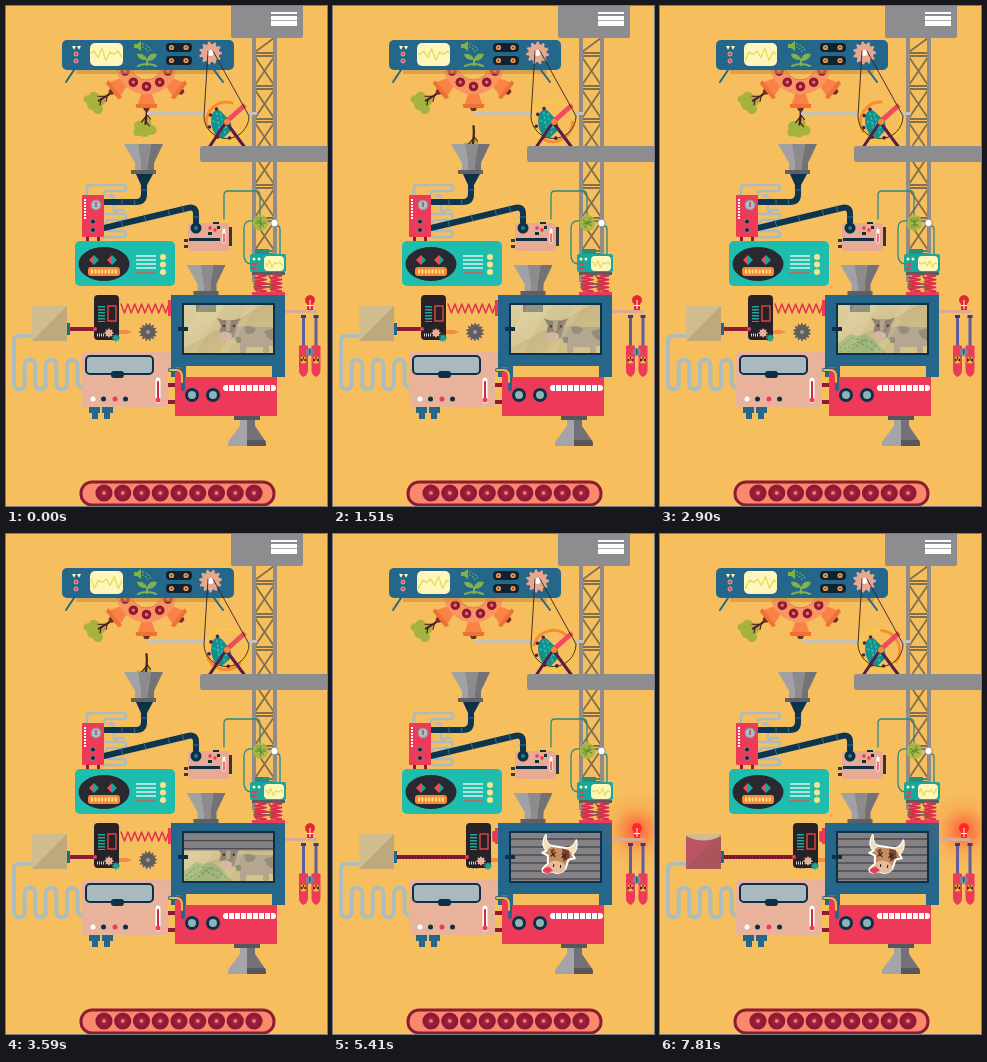
Recreate the animation shown at these times as an HTML page. Size 321 by 500 pixels, loop 8 s.

```html
<!DOCTYPE html>
<html lang="en">
<head>
<meta charset="utf-8">
<title>Machine</title>
<style>
html, body { margin: 0; width: 100%; height: 100%; overflow: hidden; background: #f6be5d; }
svg { display: block; width: 100vw; height: 100vh; }
.l { fill: none; stroke-linecap: round; stroke-linejoin: round; }
.blue { fill: #25678b; } .navy { fill: #0d3048; } .red { fill: #ee3a59; }
.peach { fill: #e9b29b; } .teal { fill: #1fbdae; } .gray { fill: #8d8c8f; }
.cream { fill: #fdf6bd; } .wine { fill: #8d1b35; } .orange { fill: #fb8f4d; }
</style>
</head>
<body>
<svg viewBox="0 0 321 500">
<defs>
  <clipPath id="drop"><path d="M70 0H200V140H70z"/></clipPath>
  <clipPath id="below"><path d="M60 40H220V140H60z"/></clipPath>
  <clipPath id="pane"><path d="M178 299H267V347H178z"/></clipPath>
  <clipPath id="scrA"><rect x="85" y="38" width="31" height="21" rx="4"/></clipPath>
  <clipPath id="scrB"><rect x="259" y="251" width="18" height="13" rx="3"/></clipPath>
  <linearGradient id="glass" x2="1" y2="1">
    <stop offset="0" stop-color="#ddd0a0"/><stop offset=".45" stop-color="#d2c290"/>
    <stop offset=".45" stop-color="#c7b583"/><stop offset="1" stop-color="#d9c78f"/>
  </linearGradient>
  <radialGradient id="glow">
    <stop offset="0" stop-color="#ff3b30" stop-opacity=".8"/><stop offset=".3" stop-color="#ff4a30" stop-opacity=".45"/>
    <stop offset=".6" stop-color="#ff5a30" stop-opacity=".13"/><stop offset="1" stop-color="#ff5a30" stop-opacity="0"/>
  </radialGradient>
  <g id="tree">
    <g fill="#a6b23f"><circle cx="-7" cy="62" r="5.500"/><circle cx="0" cy="59" r="5"/><circle cx="-2" cy="67" r="6"/><circle cx="5" cy="66" r="5"/><circle cx="-9" cy="68" r="4"/></g>
    <path class="l" stroke="#4a1f23" stroke-width="2.2" d="M0 40Q1 50-1 60"/>
    <path class="l" stroke="#4a1f23" stroke-width="1.2" d="M0 50L4 55M0 52L-5 58M-1 57L3 62"/>
  </g>
  <g id="pot">
    <path fill="#6d2f25" d="M-4 43H4L2 47H-2z"/>
    <path fill="#f98246" d="M-5 29H5L9 41H-9z"/>
    <path fill="#ef7136" d="M-11 40H11L10 44H-10z"/>
  </g>
  <g id="funnel">
    <path fill="#a1a2a5" d="M0 0H14L17 19V27H11V19z"/><path fill="#8c8c90" d="M14 0H27L24 19V27H17V19z"/>
    <path fill="#737277" d="M27 0H39L30 19V27H24V19z"/><path fill="#5f5f64" d="M7 26H32V30H7z"/>
  </g>
  <g id="can">
    <rect x="-1.5" y="-31" width="3" height="33" fill="#625c9d"/><path fill="#3f3c78" d="M-2.500-31H2.500V-28H-2.500z"/>
    <path class="red" d="M-4.500 0Q0-2 4.500 0V24Q4.500 29 0 31Q-4.500 29-4.500 24z"/>
    <circle cy="14" r="3.5" fill="#f8b93c"/><path fill="#50202b" d="M0 14L-3 12V16zM0 14L3 12V16zM0 14L-1 11H1z"/>
  </g>
</defs>

<path fill="#f6be5d" d="M0 0H321V500H0z"/>

<!-- crane -->
<g id="truss" class="l" stroke="#81704f" stroke-width="1.8"></g>
<path fill="#918c89" d="M246 32H250V276H246zM267 32H271V276H267z"/>
<rect class="gray" x="225" y="-4" width="72" height="36" rx="2"/>
<path fill="#fff" d="M265 6H291V8H265zM265 10H291V14H265zM265 14.800H291V20H265z"/>

<!-- tree wheel -->
<g id="falling" clip-path="url(#drop)"><use id="fallTree" href="#tree"/></g>
<g clip-path="url(#below)"><g transform="translate(140.500 58)">
  <g id="pots"></g>
  <circle r="23" fill="none" stroke="#fa9562" stroke-width="15"/><circle r="16" fill="none" stroke="#e27a50" stroke-width="1"/>
  <g id="disk"></g>
</g></g>
<path fill="#c98f3f" opacity=".6" d="M70 64H214V68H70z"/>

<!-- top console -->
<path class="l" stroke="#25678b" stroke-width="2" d="M68 64L60 76M208 64L217 76"/>
<rect class="blue" x="56" y="34" width="172" height="30" rx="5"/>
<path class="cream" d="M66 40H70L68 44zM71 40H75L73 44z"/>
<g fill="#ee3a59" stroke="#e7a8a0" stroke-width="1"><circle cx="70" cy="48" r="2"/><circle cx="70" cy="55" r="2"/></g>
<rect class="cream" x="84" y="37" width="33" height="23" rx="5"/>
<g clip-path="url(#scrA)"><path id="waveA" class="l" stroke="#ecd955" stroke-width="1.3"/></g>
<g fill="#7fb24b"><path d="M128 38H131L135 35V45L131 42H128z"/><path d="M140 60V54Q132 54 131 48Q138 47 141 53Q144 46 151 48Q149 55 142 55V60z"/></g>
<path class="l" stroke="#7fb24b" stroke-width="2" d="M132 60Q141 56 150 60"/>
<path class="l" stroke="#7fb24b" stroke-width="1.5" stroke-dasharray=".1 3" d="M137 38Q145 41 145 46M137 41Q141 43 142 46"/>
<g id="pills"></g>

<!-- runner wheel -->
<path fill="#c9c2b3" d="M141 106H200V109H141zM240 106H251V109H240z"/>
<g id="gear" fill="#e7a88f"></g><circle cx="204.500" cy="47" r="3" fill="#fff"/>
<g id="spin">
  <circle r="21" fill="none" stroke="#f7cf35" stroke-width="1.6"/>
  <path class="l" stroke="#f98c35" stroke-width="3" d="M-19 5A20 20 0 0 1 6-19"/>
</g>
<g id="runner">
  <path fill="#138f8d" d="M-13-8Q-8-14-4-9L1-4Q8 1 5 10L-2 17L-10 14Q-17 3-13-8z"/>
  <path class="l" stroke="#2ac4b5" stroke-width="1.5" stroke-dasharray="1.500 3" d="M-9-8L-5 13M-5-7L0 13M-12 0L3 7"/>
  <g fill="#522047"><circle cx="-15" cy="-6" r="1.8"/><circle cx="-16" cy="6" r="1.8"/><circle cx="-9" cy="-12" r="1.8"/><circle cx="-8" cy="16" r="1.8"/><circle cx="4" cy="17" r="1.8"/></g>
</g>
<path stroke="#ef4b61" stroke-width="5" d="M220 116L239 99"/>
<path class="l" stroke="#302328" stroke-width=".9" d="M202 45L198 110A22.500 22.500 0 1 0 243 110L207 45"/>
<path class="l" stroke="#5a1b46" stroke-width="3" d="M202 143L220 116L240 143"/>
<circle cx="221" cy="116" r="3" fill="#f58a35"/>
<path class="gray" d="M197 140H321V156H197Q194 156 194 153V143Q194 140 197 140z"/>

<!-- coils, pipes, red controller -->
<path class="l" stroke="#a9bcc1" stroke-width="2.600" d="M81 190V182Q81 179 84 179H117Q120 179 120 182T117 185H101Q98 185 98 188M98 208H117Q120 208 120 211T117 214H103Q100 214 100 217M98 231H117Q120 231 120 228T117 225H102M103 190Q106 188 108 192V204Q109 207 113 204H118"/>
<path fill="#0d3048" d="M130 168H147L141 179H135z"/>
<g class="l" stroke="#0d3550" stroke-width="6"><path d="M138 174V188Q138 196 130 196H99"/><path d="M98 222L182 202Q190 200 190 208V219"/></g>
<path class="l" stroke="#31738d" stroke-width="1" d="M135 184H141M116 193V199M128 193L129 199M115 215L117 221M138 209L140 215M162 204L164 210M176 200L178 206M187 211H193"/>
<use href="#funnel" x="118" y="138"/>
<path fill="#8d1b35" d="M80 231H83V236H80zM91 231H94V236H91z"/>
<rect class="red" x="76" y="189" width="22" height="42" rx="1"/>
<circle cx="90" cy="199" r="5" fill="#aebfc2" stroke="#8d8c8f"/><path stroke="#8d1b35" d="M90 196V201"/>
<path stroke="#fff" stroke-width="2" stroke-dasharray="2 1" d="M79 193V214"/>
<g class="navy" stroke="#b8828f" stroke-width=".8"><circle cx="87" cy="215.500" r="2.500"/><circle cx="87" cy="224" r="2.500"/></g>

<!-- mixer -->
<path fill="#3a3539" d="M178 233H184V236H178zM178 239H184V242H178zM222 221H226V240H222z"/>
<rect x="182" y="217" width="41" height="28" rx="2" fill="#e8aa93"/>
<circle cx="190" cy="222" r="5.500" class="navy"/><circle cx="190" cy="222" r="2" fill="#31738d"/>
<path class="navy" d="M183 232H214V235H183z"/>
<g class="red"><circle cx="204" cy="222" r="1.8"/><circle cx="209" cy="224" r="1.8"/></g><path class="navy" d="M202 226H206V229H202zM211 220H214V223H211zM207 216H213V218H207z"/>
<path class="l" stroke="#fff" stroke-width="3" d="M218 224V236"/><path class="l" stroke="#ee3a59" stroke-width="1.5" d="M218 228V236"/>

<!-- radio -->
<rect class="teal" x="69" y="235" width="100" height="45" rx="5"/>
<ellipse cx="98" cy="258" rx="25.500" ry="17" fill="#29292f"/>
<path fill="#ee4b55" d="M83 254L88 249V259zM101 254L106 249V259z"/><path fill="#19a39a" d="M88 249L93 254L88 259zM106 249L111 254L106 259z"/>
<rect x="82" y="261" width="32" height="9" rx="3" fill="#f58a35"/><path stroke="#fde08c" stroke-width="4" stroke-dasharray="2 1.4" d="M85 265.500H112"/>
<path stroke="#d8f3ea" stroke-width="1.3" d="M130 250H150M130 254H150M130 258H150M130 262H150"/><path stroke="#ee4b55" stroke-width="1.3" d="M130 267H150"/>
<g fill="#f8e38b"><circle cx="157" cy="251" r="3"/><circle cx="157" cy="258.500" r="3"/><circle cx="157" cy="266" r="3"/></g>

<!-- bulb unit -->
<path class="l" stroke="#278b87" stroke-width="1.300" d="M218 213V189Q218 185 222 185H250Q254 185 254 190V209M247 215Q238 214 238 222V249Q238 257 245 258M268 220H272Q274 220 274 224V248"/>
<circle cx="254.500" cy="217" r="8" fill="#a8b83d" opacity=".85"/><g id="bulb" class="l" stroke="#5f8f3a" stroke-width="1.2"><path d="M-5 0H5M0-5V5M-3-3L3 3"/></g>
<path fill="#278b87" d="M249 243H263V248H249z"/><circle cx="268.500" cy="217" r="3.800" fill="#fff" stroke="#8d8c8f"/>
<rect x="244" y="248" width="36" height="18" rx="2" fill="#19a79c"/>
<rect class="cream" x="258" y="250" width="20" height="15" rx="4"/>
<g clip-path="url(#scrB)"><path id="waveB" class="l" stroke="#ecd955" stroke-width="1.2"/></g>
<g class="cream"><circle cx="248" cy="253" r="1.500"/><circle cx="253" cy="253" r="1.500"/></g><path class="red" d="M246 257H251V259H246zM246 261H251V263H246z"/>
<path fill="#4c655c" d="M246 266H279V269H246z"/>
<g id="coils" class="l" stroke="#d52f4c" stroke-width="1.8"></g>
<path class="red" d="M246 286H279V290H246z"/>

<!-- puller -->
<path class="l" stroke="#a9bdc2" stroke-width="4" d="M28 330H13Q8 330 8 335V378A5.300 5.300 0 0 0 18.600 378V359A5.300 5.300 0 0 1 29.200 359V378A5.300 5.300 0 0 0 39.800 378V359A5.300 5.300 0 0 1 50.400 359V378A5.300 5.300 0 0 0 61 378V359A5.300 5.300 0 0 1 71.600 359V376Q72 382 77 381"/>
<path class="blue" d="M60 317H64V329H60z"/>
<path fill="#cfbc8f" d="M26 300H61V335H26z"/>
<path id="liquid" fill="#b85463"/>
<path fill="#7e5a30" opacity=".2" d="M61 300V335H26z"/>
<path id="rope" stroke="#8d1b35" stroke-width="4"/><path id="twist" stroke="#5c1428" stroke-width="4" stroke-dasharray="1 2"/>
<g id="saw" fill="#615e60"></g><circle cx="142" cy="326" r="2" fill="#a09b94"/>
<path id="spring" class="l" stroke="#df3952" stroke-width="1.6"/><path class="red" d="M162 294H166V310H162z"/>
<g id="phone">
  <path fill="#f58a45" d="M113 324H121L126 326L121 328H113z"/>
  <rect x="88" y="289" width="25" height="45" rx="4" fill="#272228"/>
  <rect x="102" y="300" width="8" height="15" fill="none" stroke="#ee4b45" stroke-width="1.300"/>
  <path stroke="#23a69d" stroke-width="7" stroke-dasharray="1.500 1.500" d="M95.500 300V316"/>
  <circle cx="89" cy="323" r="2" class="red"/><path stroke="#d4d4ca" stroke-width="3" stroke-dasharray="1 1" d="M91 329H98"/>
  <g id="cogA" fill="#e7b195"></g><g id="cogB" fill="#20a195"></g>
</g>

<!-- chamber -->
<g id="cubes"></g>
<use href="#funnel" x="180.500" y="259"/>
<path class="blue" d="M165 289H279V371H266V360H180V371H165z"/>
<path class="navy" d="M176 297H269V349H176z"/>
<g clip-path="url(#pane)">
  <path fill="url(#glass)" d="M178 299H267V347H178z"/>
  <path fill="#6f7470" opacity=".8" d="M190 299H210V306H190z"/>
  <g id="cow">
    <path fill="#b3a78f" d="M225 323Q235 318 250 321H272V340H263V350H257V341H240V350H234V337Q226 335 225 323z"/>
    <path fill="#958c7b" d="M238 321Q246 319 250 323Q247 330 240 327zM258 325L272 321V335Q262 336 258 325zM229 331H235V337H231z"/>
    <g id="cowHead"><path fill="#8d8273" d="M211 312L217 314H229L235 312L231 320L228 331Q220 337 213 330L215 319z"/><path fill="#b3a58c" d="M220 314H225L224 325H220z"/><ellipse cx="219" cy="330" rx="7" ry="4.500" fill="#d4b5a0"/><circle cx="218" cy="320" r="1.2" fill="#413a37"/><circle cx="228" cy="320" r="1.2" fill="#413a37"/></g>
  </g>
  <g id="feed"></g>
  <g id="pile"><path fill="#9eb57c" d="M178 347V337L184 333L190 328L197 330L205 328L213 333L221 341L226 347z"/><path class="l" stroke="#6b9c50" stroke-width="1.2" stroke-dasharray="2 3" d="M180 342L191 332L211 336L221 345M180 346L198 336L213 344M188 346L206 333"/></g>
  <path fill="#fff6c5" opacity=".12" d="M194 299H218L190 347H178V328zM241 299H250L222 347H213z"/>
  <g id="shutter"><path fill="#858286" d="M178 299H267V347H178z"/><path id="slats" stroke="#4c4a50" stroke-width="1.3"/></g>
</g>
<g id="badge" stroke-linejoin="round">
  <path fill="#c48d60" stroke="#fff" stroke-width="2" d="M-15-19Q-14-9-7-9H7Q14-9 16-18Q19-9 14-4L17 0L11 2L9 12Q4 19-4 16L-9 18Q-15 19-13 14L-9 9L-10 1L-16-1L-12-4Q-19-9-15-19z"/>
  <path fill="#efe0b8" d="M-15-19Q-14-9-7-9L-12-4Q-19-9-15-19zM16-18Q14-9 7-9L14-4Q19-9 16-18z"/>
  <path fill="#7a432e" d="M3-8L10-7L12 0L6 5zM-9-4L-5-7L-4-3z"/><ellipse cy="11" rx="9" ry="6" fill="#e6bd9b"/>
  <path fill="#ee3a59" d="M-7 12L-3 15Q-9 21-13 17Q-14 14-7 12z"/>
  <path class="l" stroke="#33211f" stroke-width="1.2" d="M-7-3L-3 1M-3-3L-7 1M4-3L8 1M8-3L4 1M-3 9V11M4 9V11"/>
</g>
<path class="navy" d="M172 321H182V325H172z"/>

<!-- alarm -->
<circle id="glowDisc" cx="303.500" cy="296" r="40" fill="url(#glow)"/>
<path fill="#dcaa91" d="M279 304H311V307H279z"/>
<path id="lamp" d="M301 304V298A5 5 0 1 1 307 298V304z"/><path fill="#fff" d="M301 299H307V300H301zM303.500 294H304.500V303H303.500z"/>
<g id="cans"><use href="#can" x="297.500" y="340"/><use href="#can" x="310" y="340"/><circle cx="303.800" cy="346" r="4" fill="#708aa3"/><path stroke="#263f59" d="M303.800 343V348"/></g>

<!-- oven and red base -->
<path class="peach" d="M160 346H165V363H160z"/>
<path class="blue" d="M83 400H94V407H83zM86 407H92V413H86zM96 400H107V407H96zM98 407H104V413H98z"/>
<rect class="peach" x="76" y="346" width="86" height="55" rx="4"/>
<rect x="80" y="350" width="67" height="18" rx="4" fill="#a8babd" stroke="#0d3048" stroke-width="2"/>
<rect class="navy" x="105" y="365" width="13" height="7" rx="3"/>
<circle cx="87" cy="393" r="2.500" fill="#fff"/><circle class="navy" cx="97.500" cy="393" r="2.500"/><circle class="red" cx="109" cy="393" r="2.500"/><circle class="navy" cx="119.500" cy="393" r="2.500"/>
<path class="l" stroke="#fff" stroke-width="5" d="M152 374V395"/><path class="l" stroke="#c52d43" stroke-width="2" d="M152 376V394"/><circle cx="152" cy="394" r="2.500" class="red"/>
<path class="wine" d="M162 377H170V381H162zM162 394H170V398H162z"/>
<path class="red" d="M169 371H271V410H169zM169 361H175V372H169z"/>
<path class="l" stroke="#25678b" stroke-width="4" d="M164 364H171Q177 364 177 371V383"/><path class="l" stroke="#f3b93d" stroke-width="2" d="M164 364H170Q176 364 176 371V376"/>
<g fill="#8fb2b4" stroke="#0d3048" stroke-width="3"><circle cx="186" cy="389" r="5.500"/><circle cx="207" cy="389" r="5.500"/></g>
<rect x="217" y="379" width="53" height="6" rx="3" fill="#fff"/><path stroke="#ee3a59" stroke-width="6" stroke-dasharray="1 5" d="M222 382H268"/>
<path fill="#59565b" d="M228 410H254V414H228z"/><path fill="#a3a5a8" d="M234 414H241V440H222V436L234 420z"/><path fill="#737176" d="M241 414H249V420L260 436V440H241z"/><path fill="#59565b" d="M241 434H259L260 440H241z"/>

<!-- conveyor -->
<rect x="75" y="476" width="193" height="23" rx="11" fill="#f9886c" stroke="#8d1b35" stroke-width="3"/>
<g id="rollers"></g>
</svg>
<script>
const $ = id => document.getElementById(id);
const set = (id, attr, value) => $(id).setAttribute(attr, value);
const fill = (id, n, draw) => { $(id).innerHTML = Array.from({ length: n }, (_, i) => draw(i)).join(''); };
const clamp = v => Math.min(1, Math.max(0, v));
const span = (t, a, b) => clamp((t - a) / (b - a));
const ease = x => x * x * (3 - 2 * x);
const lerp = (a, b, x) => a + (b - a) * x;
const mix = (a, b, x) => `rgb(${a.map((v, i) => Math.round(lerp(v, b[i], x)))})`;
const show = (id, v) => set(id, 'opacity', v);

const cog = (r, n, tooth) => {
  const pts = Array.from({ length: n * 4 }, (_, i) => {
    const a = (i - .5) * Math.PI / n / 2, d = i % 4 < 2 ? r : r - tooth;
    return `${(Math.cos(a) * d).toFixed(1)} ${(Math.sin(a) * d).toFixed(1)}`;
  });
  return `<path d="M${pts.join('L')}z"/>`;
};
const zigzag = (x, n, step, y, amp) => 'M' + Array.from({ length: n }, (_, i) =>
  `${x + i * step} ${y + amp * [0, -.6, .5, -1, 1, -.4][i % 6]}`).join('L');

const POTS = 7, GAP = 360 / POTS, HOLES = 10;
const STEP = 520, FIRST = 270, DROPS = 8;

fill('truss', 8, i => { const y = 48 + i * 33; return `<path d="M248 ${y - 1}H269M248 ${y + 2}H269M249 ${y + 3}L268 ${y + 31}M268 ${y + 3}L249 ${y + 31}"/>`; });
$('truss').innerHTML += '<path d="M268 32L249 46"/>';
fill('coils', 2, i => `<path d="M${Array.from({ length: 11 }, (_, j) => `${249 + i * 15.5 + j % 2 * 11} ${268 + j * 1.9}`).join('L')}"/>`);
fill('pots', POTS, () => '<g class="arm"><use href="#tree"/><use href="#pot"/></g>');
fill('disk', HOLES, i => `<g transform="rotate(${i * 360 / HOLES}) translate(0 22.500)"><circle r="4.800" class="wine"/><circle r="1.7" fill="#ee6b62"/></g>`);
fill('pills', 2, i => `<rect x="160" y="${37 + 13 * i}" width="26" height="9" rx="4" fill="#10222f"/>` +
  [165.5, 180].map(x => `<circle cx="${x}" cy="${41.5 + 13 * i}" r="2.600" fill="#f1984c"/><circle cx="${x}" cy="${41.5 + 13 * i}" r="1" fill="#7b432a"/>`).join(''));
fill('rollers', 9, i => `<g transform="translate(${98 + i * 18.75} 487)"><circle r="8.600" class="wine"/><circle r="5" fill="#a01d3b"/><circle r="2" fill="#f0756c"/></g>`);
const cube = (x, y) => `<g transform="translate(${x} ${y}) rotate(-5)"><rect x="-4.500" y="-6.500" width="9" height="13" rx="2" fill="#a9bd58" stroke="#72963f"/><path class="l" stroke="#72963f" d="M-2-3L2 0L-2 3M2-4L0-2M2 4L0 2"/></g>`;
fill('cubes', 2, i => cube(193 + i * 13, -i * 5));
fill('feed', 6, i => cube(193 + i % 2 * 14, (i >> 1) * 16 - i % 2 * 4));
$('gear').innerHTML = cog(11.5, 11, 2.5); $('saw').innerHTML = cog(9, 14, 2);
$('cogA').innerHTML = cog(4.6, 8, 1.3); $('cogB').innerHTML = cog(4, 8, 1.3);
set('slats', 'd', Array.from({ length: 6 }, (_, i) => `M178 ${305 + i * 8}H267`).join(''));
set('waveA', 'd', zigzag(60, 24, 4, 48.5, 6));
set('waveB', 'd', zigzag(240, 24, 2.6, 258, 3.5));

const arms = [...document.querySelectorAll('.arm')];

// The bottom tree drops, then the next one swings into its place.
function treeWheel(t) {
  const k = Math.min(DROPS - 1, Math.floor((t - FIRST) / STEP));
  const rel = t - FIRST - k * STEP, waiting = k < 0;
  const turn = waiting || k === DROPS - 1 ? 0 : ease(span(rel, 200, 480));
  const steps = Math.max(0, k) + turn;
  arms.forEach((arm, i) => {
    const a = ((i - steps + 2 * POTS) * GAP + 90) % 360 - 90;
    const loaded = a < 110 && a > (waiting ? -5 : 5 - GAP * turn);
    arm.setAttribute('transform', `rotate(${a})`);
    arm.firstChild.setAttribute('opacity', loaded ? 1 : 0);
  });
  const half = span(t, 3910, 4150) / 2;
  set('disk', 'transform', `rotate(${(half - steps) * 360 / HOLES})`);
  show('falling', !waiting && rel < 400 ? 1 : 0);
  set('fallTree', 'transform', `translate(140.500 ${58 + 46 * (rel / 290) ** 2})`);
}

function chamber(t) {
  show('cubes', t > 840 && t < 1180 ? 1 : 0);
  set('cubes', 'transform', `translate(0 ${lerp(234, 275, span(t, 840, 1180))})`);
  show('feed', t > 1700 && t < 2400 ? .7 : 0);
  set('feed', 'transform', `translate(0 ${t < 1960 ? lerp(262, 309, span(t, 1700, 1960)) : lerp(309, 349, span(t, 2050, 2400))})`);
  show('pile', span(t, 2150, 2400) * .9);
  set('pile', 'transform', `translate(0 ${lerp(15, 0, ease(span(t, 2150, 2500)))})`);
  const chew = t < 3700 ? Math.sin(t * Math.PI / 245) : 0;
  set('cowHead', 'transform', `translate(0 ${chew * .8})`);
  set('shutter', 'transform', `translate(0 ${lerp(-50, 0, ease(span(t, 3420, 3820)))})`);
  set('badge', 'transform', `translate(225 322) rotate(8) scale(${ease(span(t, 3820, 4060))})`);
}

function puller(t) {
  const x = 45 * ease(span(t, 4410, 4780)), left = 113 + x;
  set('phone', 'transform', `translate(${x} 0)`);
  set('rope', 'd', `M64 323H${88 + x}`);
  set('twist', 'd', `M64 323H${88 + x}`);
  show('twist', span(x, 0, 10));
  set('cogA', 'transform', `translate(103 327) rotate(${x * 8})`);
  set('cogB', 'transform', `translate(110 332) rotate(${-x * 10})`);
  set('saw', 'transform', `translate(142 326) rotate(${t < 4180 ? t * .35 : 0})`);
  set('spring', 'd', 'M' + Array.from({ length: 15 }, (_, i) =>
    `${lerp(left + 2, 163, i / 14)} ${302.5 + (i % 2 ? 4.5 : -4.5)}`).join('L'));

  const full = span(t, 5880, 6560) * .6 + span(t, 6690, 6820) * .15
    + span(t, 6990, 7050) * .1 + span(t, 7550, 7790) * .15;
  const y = lerp(335, 302, full);
  set('liquid', 'd', `M26 ${y}Q43.5 ${Math.min(335, y + 9)} 61 ${y}V335H26z`);
}

function alarm(t) {
  const edges = [4770, 5050, 5340, 5610, 5880, 6150, 6430, 6690, 6990, 7220, 7550];
  const lit = edges.reduce((v, e, i) => lerp(v, i % 2 ? 0 : 1, span(t, e, e + 70)), 0);
  show('glowDisc', lit);
  set('lamp', 'fill', mix([232, 38, 48], [255, 40, 36], lit));
  set('cans', 'transform', `translate(0 ${Math.sin(Math.PI * span(t, 4200, 4300)) * -1.5})`);
  return edges.reduce((sum, e) => sum + span(t, e, e + 70), 0);
}

function frame(now) {
  const t = now % 8000, run = Math.min(t, 4180), kick = alarm(t);
  treeWheel(t);
  chamber(t);
  puller(t);
  set('gear', 'transform', `translate(204.5 47) rotate(${run * .18})`);
  set('spin', 'transform', `translate(220 116) rotate(${run * 360 / 980 - 96 * span(t, 4100, 4180) + kick * 10})`);
  set('runner', 'transform', `translate(219.5 115) rotate(${t < 4180 ? 5 * Math.sin(t * Math.PI / 245) : 4 * Math.sin(kick * 2)})`);
  set('bulb', 'transform', `translate(254.5 217) rotate(${run * .2})`);
  const scroll = run * .03 + kick * 3;
  set('waveA', 'transform', `translate(${-(scroll % 24)} 0)`);
  set('waveB', 'transform', `translate(${-(scroll % 15.6)} 0)`);
}

const start = performance.now();
const loop = () => { frame(performance.now() - start); requestAnimationFrame(loop); };
loop();
</script>
</body>
</html>
```
